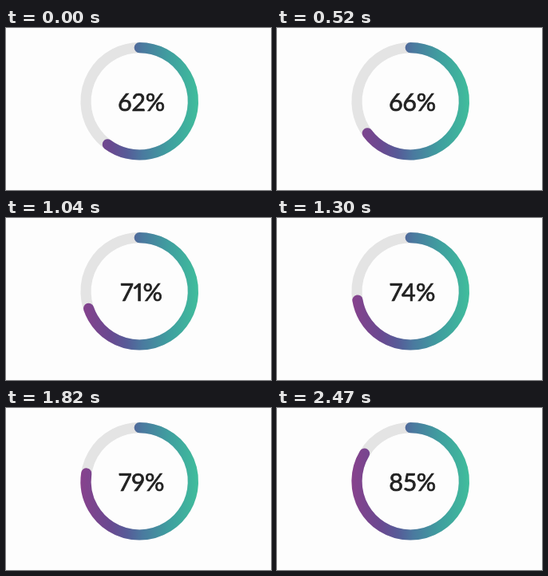
An HTML page that plays this animation: 332 px wide and 203 px high, repeating every 2600 ms.

```html
<!DOCTYPE html>
<html lang="en">
<head>
<meta charset="utf-8">
<title>Progress ring</title>
<style>
  html, body { margin: 0; width: 100%; height: 100%; overflow: hidden; background: #fdfdfd; }
  svg { display: block; width: 332px; height: 203px; }
  path { fill: none; stroke-width: 13.2; stroke-linecap: round; }
  text {
    font: 30.5px Lato, sans-serif; font-variant-numeric: proportional-nums;
    fill: #222; stroke: #222; stroke-width: .7; text-anchor: middle;
  }
</style>
</head>
<body>
<svg viewBox="0 0 332 203">
  <defs>
    <linearGradient id="hue" gradientUnits="userSpaceOnUse" x1="93" y1="0" x2="241" y2="0">
      <stop offset="0" stop-color="#88428d"/>
      <stop offset=".25" stop-color="#6a4990"/>
      <stop offset=".4" stop-color="#565c98"/>
      <stop offset=".53" stop-color="#4a7a9f"/>
      <stop offset=".75" stop-color="#3f9f9f"/>
      <stop offset="1" stop-color="#40bd9c"/>
    </linearGradient>
  </defs>
  <path stroke="#e4e4e4" d="M167.2 24.6a67.2 67.2 0 1 1-.01 0z"/>
  <path id="arc" stroke="url(#hue)" pathLength="100" d="M167.2 24.6a67.2 67.2 0 1 1-.01 0"/>
  <text id="label" x="169.7" y="104"></text>
</svg>
<script>
  const LOOP = 2600, STEP = 130, ARC_LAG = 1.5;
  const arc = document.getElementById('arc');
  const label = document.getElementById('label');

  // Steady climb, with a short hold near the start
  function percentAt(step) {
    if (step < 1) return 61.6;
    if (step < 3) return 63;
    return 66.3 + 1.255 * (step - 4);
  }

  function draw(now) {
    const percent = percentAt(Math.floor(now % LOOP / STEP));
    arc.setAttribute('stroke-dasharray', `${percent - ARC_LAG} 100`);
    label.textContent = Math.round(percent) + '%';
  }

  let start;
  function tick(now) {
    start ??= now;
    draw(now - start);
    requestAnimationFrame(tick);
  }
  draw(0);
  requestAnimationFrame(tick);
</script>
</body>
</html>
```
